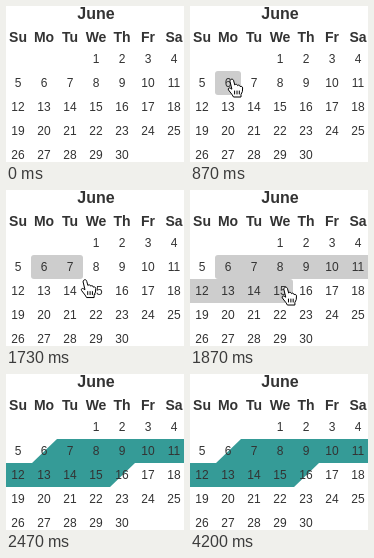
Write an HTML page that moves like this. It is 178 px wide and 156 px high and loops after 4740 ms.

```html
<!DOCTYPE html>
<html lang="en">
<head>
<meta charset="utf-8">
<title>June</title>
<style>
  html, body { margin: 0; width: 100%; height: 100%; overflow: hidden; background: #fff; }
  svg { display: block; width: 178px; height: 156px; }
  text { font: 12px "Liberation Sans", Arial, sans-serif; fill: #333; text-anchor: middle; }
  .head { font-size: 14px; font-weight: bold; }
  .title { font-size: 16px; font-weight: bold; }
</style>
</head>
<body>
<svg viewBox="0 0 178 156">
  <g id="selection" fill="#cdcdcd"></g>
  <path id="range" fill="#359b97" d="M26 89L51 65H178V89H129L104 113H0V89Z"/>
  <g id="labels"></g>
  <g id="hand" stroke="#000" stroke-linejoin="round" stroke-linecap="round">
    <path fill="#fff" d="M-2 2C-2-.5 1.5-.5 1.7 2L2.8 6C3.5 4.8 5.4 5.2 5.6 6.6C6.5 5.6 8 6.2 8.2 7.6C9.3 6.8 10.6 7.6 10.6 9L10.4 12.5 9 15.5V18H1.5L0 15.5-3.5 11C-4.5 9.3-2.5 8-1 9.8L-.5 10Z"/>
    <path fill="none" d="M2.6 12v3M5 12v3M7.3 12v3"/>
  </g>
</svg>
<script>
const LOOP = 4740, FPS = 15;
const CELL_W = 26, CELL_H = 24, LEFT = -1, TOP = 41;
const DRAG_START = 23, RELEASE = 36, FIRST_CELL = 8;
const $ = id => document.getElementById(id);

const label = (text, x, y, cls = '') => `<text class="${cls}" x="${x}" y="${y}">${text}</text>`;
const colX = col => 12 + col * CELL_W;
let labels = label('June', 90, 13, 'title');
['Su', 'Mo', 'Tu', 'We', 'Th', 'Fr', 'Sa'].forEach((day, i) => labels += label(day, colX(i), 36, 'head'));
for (let day = 1; day <= 30; day++) {
  const cell = day + 2;
  labels += label(day, colX(cell % 7), 57 + CELL_H * Math.floor(cell / 7));
}
$('labels').innerHTML = labels;

// Decelerating move between two points, timed in frames
function move(frame, start, end, from, to) {
  const u = Math.min(1, Math.max(0, (frame - start) / (end - start)));
  const k = 1 - (1 - u) ** 1.8;
  return from.map((v, i) => v + (to[i] - v) * k);
}

const pointerAt = frame => frame < DRAG_START
  ? move(frame, 5, 13, [-12, 140], [42, 73])
  : move(frame, DRAG_START, 31, [42, 73], [107, 102]);

function cellAt([x, y]) {
  return x < 0 ? -1 : Math.floor((y - TOP) / CELL_H) * 7 + Math.floor((x - LEFT) / CELL_W);
}

// One rounded bar per week; bars that continue run past the stage edge
function bars(first, last) {
  let out = '';
  for (let row = Math.floor(first / 7); row <= Math.floor(last / 7); row++) {
    const x0 = first < row * 7 ? -10 : LEFT + first % 7 * CELL_W;
    const x1 = last > row * 7 + 6 ? 190 : LEFT + (last % 7 + 1) * CELL_W;
    out += `<rect x="${x0}" y="${TOP + row * CELL_H}" width="${x1 - x0}" height="${CELL_H}" rx="3"/>`;
  }
  return out;
}

function draw(now) {
  const frame = Math.floor(now % LOOP * FPS / 1000 + 0.06);
  const released = frame >= RELEASE;
  const [x, y] = pointerAt(frame);
  const hover = cellAt(pointerAt(frame - 1)); // the highlight trails the pointer
  const first = frame >= DRAG_START ? FIRST_CELL : hover;

  $('selection').innerHTML = released || hover < 0 ? '' : bars(first, hover);
  $('range').style.display = released ? '' : 'none';
  $('hand').style.display = released || frame < 6 ? 'none' : '';
  $('hand').setAttribute('transform', `translate(${x} ${y})`);
}

const began = performance.now();
function tick() {
  draw(performance.now() - began);
  requestAnimationFrame(tick);
}
tick();
</script>
</body>
</html>
```
